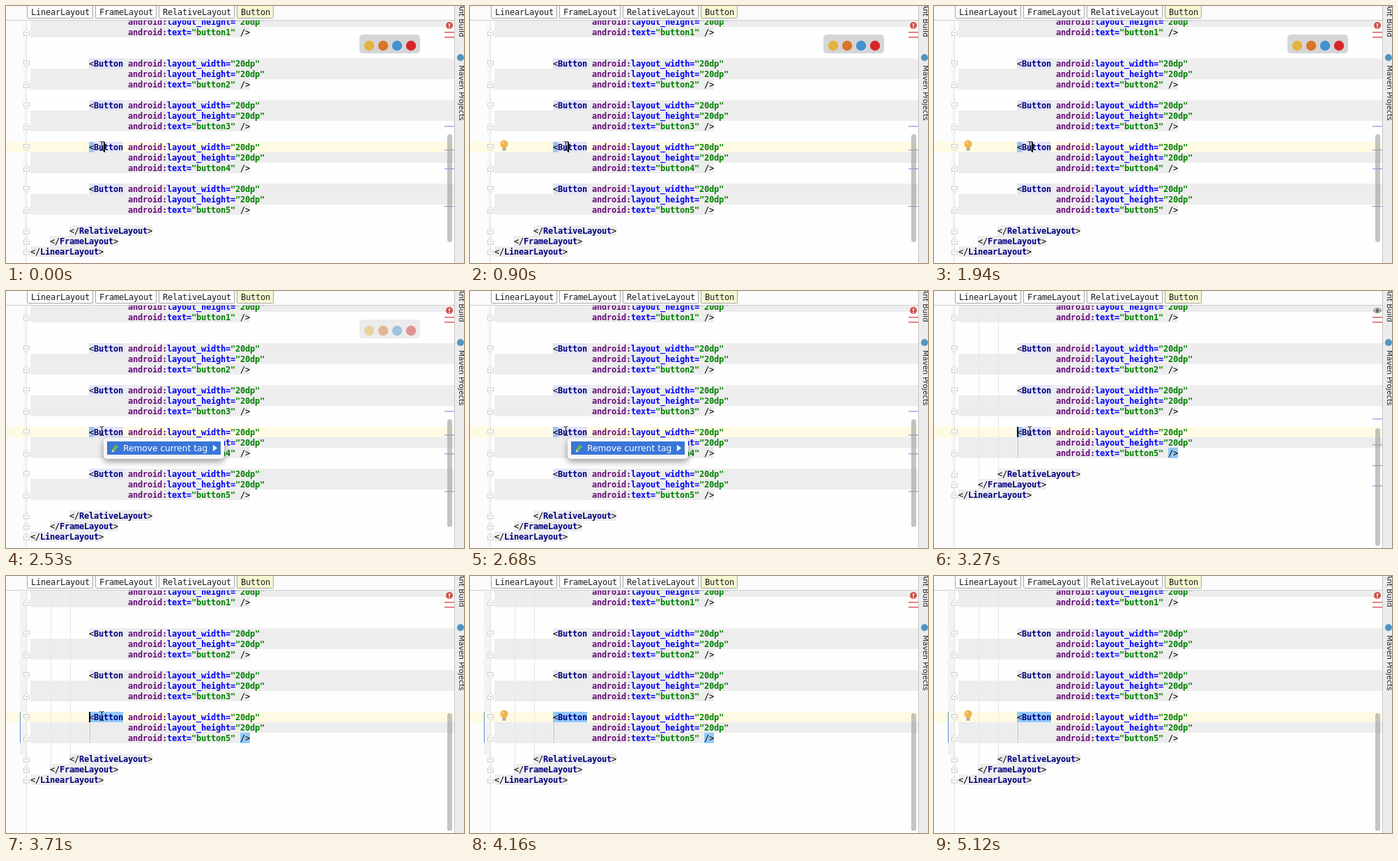
Animation, 657 px wide and 369 px high, one loop 5.22 s. Source, as an HTML page with a canvas:

```html
<!DOCTYPE html>
<html lang="en">
<head>
<meta charset="utf-8">
<title>Remove current tag</title>
<style>
html, body { margin: 0; width: 100%; height: 100%; overflow: hidden; background: #fff; }
canvas { display: block; width: 657px; height: 369px; }
</style>
</head>
<body>
<canvas id="stage" width="657" height="369"></canvas>
<script>
const ctx = document.getElementById('stage').getContext('2d');
const LOOP = 5220, CHAR = 7, ROW = 15, LEFT = 35, RIGHT = 643;
const MONO = '"DejaVu Sans Mono", monospace';
const SANS = '"DejaVu Sans", sans-serif';
const NAVY = '#000080', PURPLE = '#660e7a', BLUE = '#0000ff', GREEN = '#008000';
const GREY = '#ededed', LAVENDER = '#e2e4f6', MATCH = '#93c9fb', CARET_ROW = '#fffae3';
const rowY = r => 15 + r * ROW;
const within = (t, a, b) => t >= a && t < b;

function rect(x, y, w, h, fill) {
  ctx.fillStyle = fill;
  ctx.fillRect(x, y, w, h);
}

function roundRect(x, y, w, h, r, fill, stroke) {
  ctx.beginPath();
  ctx.roundRect(x, y, w, h, r);
  if (fill) { ctx.fillStyle = fill; ctx.fill(); }
  if (stroke) { ctx.strokeStyle = stroke; ctx.lineWidth = 1; ctx.stroke(); }
}

function circle(x, y, r, fill) {
  ctx.beginPath();
  ctx.arc(x, y, r, 0, Math.PI * 2);
  ctx.fillStyle = fill;
  ctx.fill();
}

function poly(points, fill, stroke) {
  ctx.beginPath();
  points.forEach(([x, y]) => ctx.lineTo(x, y));
  ctx.closePath();
  if (fill) { ctx.fillStyle = fill; ctx.fill(); }
  if (stroke) { ctx.strokeStyle = stroke; ctx.lineWidth = 1; ctx.stroke(); }
}

// Draws monospaced text on the 7px grid and returns the x after it.
function mono(text, x, y, color, bold) {
  ctx.font = (bold ? 'bold ' : '') + '12px ' + MONO;
  ctx.letterSpacing = '-0.224px';
  ctx.fillStyle = color;
  ctx.fillText(text, x, y);
  ctx.letterSpacing = '0px';
  return x + text.length * CHAR;
}

function attribute(r, name, value) {
  const y = rowY(r) + 12;
  let x = mono('android:', 175, y, PURPLE, true);
  x = mono(name + '=', x, y, BLUE, true);
  return mono('"' + value + '"', x, y, GREEN, true);
}

function buttonBands(r) {
  rect(119, rowY(r), RIGHT - 119, ROW, GREY);
  rect(LEFT, rowY(r + 1), RIGHT - LEFT, ROW, GREY);
  rect(LEFT, rowY(r + 2), 350 - LEFT, ROW, GREY);
}

function buttonText(r, n) {
  mono('<', 119, rowY(r) + 12, '#000');
  mono('Button', 126, rowY(r) + 12, NAVY, true);
  attribute(r, 'layout_width', '20dp');
  attribute(r + 1, 'layout_height', '20dp');
  const x = attribute(r + 2, 'text', 'button' + n);
  mono('/>', x + CHAR, rowY(r + 2) + 12, '#000');
}

function closingTag(r, x, name) {
  const y = rowY(r);
  rect(x, y, (name.length + 3) * CHAR, ROW, GREY);
  let end = mono('</', x, y + 12, '#000');
  end = mono(name, end, y + 12, NAVY, true);
  mono('>', end, y + 12, '#000');
}

function foldMark(r, dir) {
  const y = rowY(r) + 8;
  const pts = [[-4, -4], [4, -4], [4, 1], [0, 5], [-4, 1]];
  poly(pts.map(([px, py]) => [29.5 + px, y + py * dir]), '#fff', '#c9c9c9');
  rect(27.5, y - 0.5, 4, 1, '#b5b5b5');
}

function editor(t) {
  const removed = t >= 3270;
  const starts = removed ? [4, 8, 12] : [4, 8, 12, 16];
  const close = removed ? 16 : 20;

  rect(0, 0, 657, 369, '#fefefe');
  rect(0, 21, 29, 348, '#fcfcfc');
  if (t >= 3710) rect(20, 22, 9, 235, '#f3f3f3');
  else rect(25, 22, 4, 347, '#f7f7f7');

  rect(LEFT, rowY(0), RIGHT - LEFT, ROW, GREY);
  rect(LEFT, rowY(1), 350 - LEFT, ROW, GREY);
  starts.forEach(buttonBands);
  rect(0, rowY(12), RIGHT, ROW, CARET_ROW);
  rect(29, 21, 1, 348, '#e2e2e2');

  if (removed) {
    rect(64, 22, 1, 248, '#e6e6e6');
    rect(92, 22, 1, 233, '#e6e6e6');
    rect(120, 210, 1, 30, '#c4c4c4');
  }

  if (t < 3560) starts.forEach(r => rect(126, rowY(r), 42, ROW, LAVENDER));
  if (!removed) starts.forEach(r => rect(119, rowY(r), 7, ROW, LAVENDER));
  rect(119, rowY(12), 7, ROW, removed ? MATCH : '#9cc4ee');
  if (t >= 3710) rect(126, rowY(12), 42, ROW, MATCH);
  if (within(t, 3270, 5120)) rect(336, rowY(14), 14, ROW, MATCH);

  attribute(0, 'layout_height', '20dp');
  mono('/>', attribute(1, 'text', 'button1') + CHAR, rowY(1) + 12, '#000');
  starts.forEach((r, i) => buttonText(r, removed && i === 2 ? 5 : i + 2));
  closingTag(close, 91, 'RelativeLayout');
  closingTag(close + 1, 63, 'FrameLayout');
  closingTag(close + 2, 35, 'LinearLayout');

  foldMark(1, -1);
  starts.forEach(r => { foldMark(r, 1); foldMark(r + 2, -1); });
  [0, 1, 2].forEach(i => foldMark(close + i, -1));
  if (t >= 3710) rect(20, 195, 1, 45, '#5f8fc4');
}

function breadcrumbs() {
  rect(0, 0, 643, 20, '#fbfbfb');
  rect(0, 20, 643, 1, '#cfcfcf');
  [['LinearLayout', 36], ['FrameLayout', 134], ['RelativeLayout', 225], ['Button', 337]].forEach(([name, x]) => {
    const last = name === 'Button';
    roundRect(x - 5.5, -3.5, name.length * CHAR + 10, 21, 1, last ? '#f5f8d2' : '#fdfdfd', '#a5a5a5');
    mono(name, x, 13, '#1c1c1c');
  });
}

function sideLabel(text, y) {
  ctx.save();
  ctx.translate(650, y);
  ctx.rotate(Math.PI / 2);
  ctx.font = '10.5px ' + SANS;
  ctx.fillStyle = '#222';
  ctx.fillText(text, 0, 0);
  ctx.restore();
}

function sidePanel() {
  rect(643, 0, 14, 369, '#ececec');
  rect(643, 0, 1, 369, '#c6c6c6');
  sideLabel('Ant Build', -3);
  circle(652, 74, 5, '#4f94c4');
  sideLabel('Maven Projects', 85);
}

function eye() {
  ctx.beginPath();
  ctx.moveTo(630.5, 28);
  ctx.quadraticCurveTo(636, 21, 641.5, 28);
  ctx.quadraticCurveTo(636, 35, 630.5, 28);
  ctx.fillStyle = '#f4f4f4';
  ctx.fill();
  ctx.strokeStyle = '#777';
  ctx.lineWidth = 1.2;
  ctx.stroke();
  circle(636, 28, 2.6, '#666');
}

function errorStripe(t) {
  const removed = t >= 3270;
  if (within(t, 3270, 3710)) eye();
  else {
    circle(636, 28, 5, '#d0524c');
    rect(635.2, 25, 1.6, 4, '#fff');
    rect(635.2, 30, 1.6, 1.6, '#fff');
  }
  [37, 44].forEach(y => rect(629, y, 14, 1.5, '#dc5f5a'));
  if (t < 3560) {
    const marks = removed ? [183, 220, 250, 279] : [172, 206, 233, 287];
    marks.forEach(y => rect(629, y, 14, 1.5, '#aaa6ee'));
  }
  const top = removed ? 197 : 184, bottom = removed ? 366 : 339;
  roundRect(633, top, 7, bottom - top, 3.5, 'rgba(150,150,150,.55)');
}

function browserBar(t) {
  const alpha = t < 2530 ? 1 : t < 2680 ? 0.45 : 0;
  if (!alpha) {
    return;
  }
  ctx.globalAlpha = alpha;
  roundRect(507, 41, 87, 27, 5, '#d5d5d5');
  ['#e2b33c', '#d9742b', '#4391d0', '#d8252c'].forEach((c, i) => circle(521 + i * 20, 57, 7.2, c));
  ctx.globalAlpha = 1;
}

function bulb() {
  circle(49, 198, 5.6, '#efb44d');
  poly([[45.5, 201], [52.5, 201], [51.5, 204], [46.5, 204]], '#efb44d');
  circle(47.5, 196.5, 1.8, '#f8d28a');
  rect(46.5, 204, 5, 1.2, '#8f8f8f');
  rect(46.5, 206, 5, 1.2, '#777');
}

function iBeam(x, y) {
  ctx.beginPath();
  ctx.moveTo(x - 3, y - 6.5);
  ctx.quadraticCurveTo(x, y - 6.5, x, y - 4.5);
  ctx.quadraticCurveTo(x, y - 6.5, x + 3, y - 6.5);
  ctx.moveTo(x, y - 5);
  ctx.lineTo(x, y + 5);
  ctx.moveTo(x - 3, y + 6.5);
  ctx.quadraticCurveTo(x, y + 6.5, x, y + 4.5);
  ctx.quadraticCurveTo(x, y + 6.5, x + 3, y + 6.5);
  ctx.strokeStyle = '#222';
  ctx.lineWidth = 1.1;
  ctx.stroke();
}

function caret(t) {
  const on = t < 450 || within(t, 900, 1490) || within(t, 1940, 2530) || within(t, 3120, 4160) || within(t, 4600, 5120);
  if (on) rect(t < 3270 ? 140 : 119, 195, 2, ROW, '#000');
}

function popup() {
  ctx.save();
  ctx.shadowColor = 'rgba(0,0,0,.4)';
  ctx.shadowBlur = 10;
  ctx.shadowOffsetY = 4;
  roundRect(140, 211, 173, 30, 5, '#f8f8f8');
  ctx.restore();
  rect(145, 216, 163, 19, '#3a76d8');
  poly([[152, 228], [157, 221], [161, 223], [156, 230]], '#6cbb4b');
  poly([[152, 228], [156, 230], [152, 231.5]], '#e8e0b8');
  ctx.font = '12.2px ' + SANS;
  ctx.fillStyle = '#fff';
  ctx.fillText('Remove current tag', 168, 230);
  poly([[297, 221], [303, 225.5], [297, 230]], '#fff');
}

function draw(t) {
  editor(t);
  breadcrumbs();
  errorStripe(t);
  sidePanel();
  browserBar(t);
  if (within(t, 300, 2530) || t >= 4160) bulb();
  caret(t);
  if (within(t, 2530, 3120)) popup();
  if (t < 4010) iBeam(137.5, 201);
  else if (t < 4160) iBeam(187, 215);
}

const start = performance.now();
function frame() {
  draw((performance.now() - start) % LOOP);
  requestAnimationFrame(frame);
}
frame();
</script>
</body>
</html>
```
